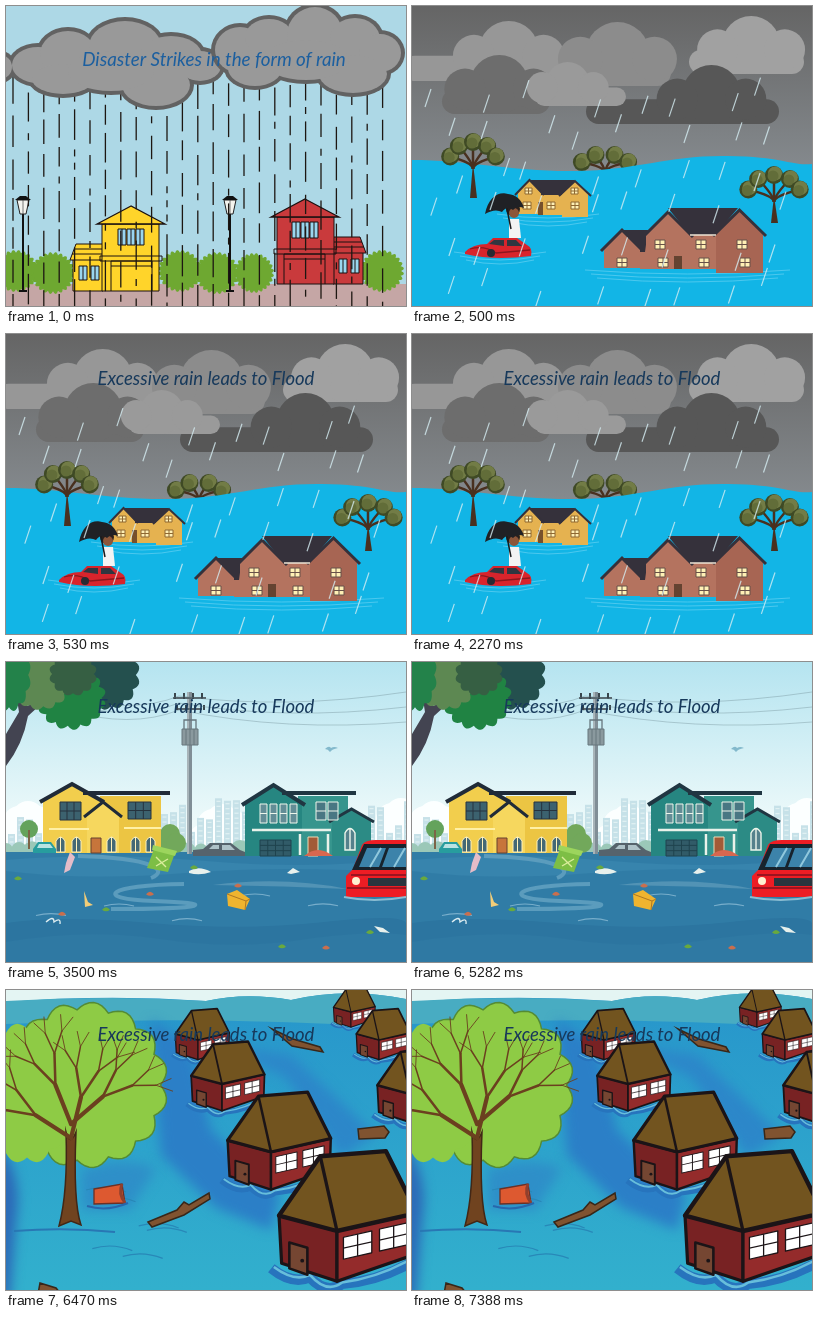
Recreate the animation shown at these times as an HTML page with a canvas. Size 400 px wide and 300 px high, loop 8 s.

```html
<!DOCTYPE html>
<html lang="en">
<head>
<meta charset="utf-8">
<title>Rain and flood</title>
<style>
  html, body { margin: 0; width: 100%; height: 100%; overflow: hidden; }
  canvas { display: block; width: 400px; height: 300px; }
</style>
</head>
<body>
<canvas id="stage" width="400" height="300"></canvas>
<script>
const ctx = document.getElementById('stage').getContext('2d');

// Drawing helpers
function path(d, fill, stroke, width = 1) {
  const p = new Path2D(d);
  if (fill) { ctx.fillStyle = fill; ctx.fill(p); }
  if (stroke) { ctx.strokeStyle = stroke; ctx.lineWidth = width; ctx.stroke(p); }
}
function box(x, y, w, h, fill, stroke, width) {
  path(`M${x} ${y}h${w}v${h}h${-w}z`, fill, stroke, width);
}
function oval(x, y, rx, ry, fill) {
  ctx.fillStyle = fill;
  ctx.beginPath();
  ctx.ellipse(x, y, rx, ry, 0, 0, Math.PI * 2);
  ctx.fill();
}
const dot = (x, y, r, fill) => oval(x, y, r, r, fill);

function backdrop(top, bottom, height) {
  const g = ctx.createLinearGradient(0, 0, 0, height);
  g.addColorStop(0, top);
  g.addColorStop(1, bottom);
  box(0, 0, 400, 300, g);
}
function seeded(seed) {
  return (lo = 0, hi = 1) => {
    seed = (seed * 16807) % 2147483647;
    return lo + (hi - lo) * seed / 2147483647;
  };
}
function caption(text, x, y, color, size) {
  ctx.font = `italic ${size}px Lato, sans-serif`;
  ctx.textAlign = 'center';
  ctx.fillStyle = color;
  ctx.fillText(text, x, y);
}
// Closed outline with n scallops
function scallop(x, y, rx, ry, n, depth, fill, stroke) {
  let d = '';
  for (let i = 0; i < n * 8; i++) {
    const a = i * Math.PI / (n * 4);
    const k = 1 - depth + depth * Math.abs(Math.sin(a * n / 2));
    d += `${i ? 'L' : 'M'}${x + rx * k * Math.cos(a)} ${y + ry * k * Math.sin(a)}`;
  }
  path(d + 'z', fill, stroke, 1.5);
}
function panes(x, y, w, h, fill, frame, cols = 2, rows = 2) {
  box(x, y, w, h, fill, frame);
  for (let i = 1; i < cols; i++) path(`M${x + w * i / cols} ${y}v${h}`, null, frame);
  for (let i = 1; i < rows; i++) path(`M${x} ${y + h * i / rows}h${w}`, null, frame);
}
function windowRow(n, step, x, ...rest) {
  for (let i = 0; i < n; i++) panes(x + i * step, ...rest);
}
// House front under a pitched roof
function gable(left, right, top, eave, base, wall, roof, width = 3) {
  const mid = (left + right) / 2;
  path(`M${left + 3} ${base}V${eave - 2}L${mid} ${top}L${right - 3} ${eave - 2}V${base}z`, wall);
  path(`M${left} ${eave}L${mid} ${top}L${right} ${eave}`, null, roof, width);
}

// Scene 1: rain over the street
function stormCloud(lobes) {
  for (const [grow, color] of [[2, '#626262'], [-2, '#999']])
    for (const [x, y, rx, ry] of lobes) oval(x, y, rx + grow, ry + grow, color);
}
function lamp(x) {
  path(`M${x} 208V285`, null, '#111', 2);
  path(`M${x - 6} 194h12l-3 14h-6z`, '#f4f4ee', '#222');
  path(`M${x} 194v14`, null, '#444', 0.7);
  path(`M${x - 8} 194l5 -4h6l5 4z`, '#111');
  box(x - 4, 284, 8, 2, '#111');
}
function townHouse(x, y, side, color) {
  const ink = '#1a1010', glass = '#9ad6ee';
  ctx.save();
  ctx.translate(x, y);
  ctx.save();
  ctx.scale(side, 1);
  box(28, 53, 30, 32, color, ink);
  path('M28 38H55L61 54H28zM28 43H57M28 48H59', color, ink);
  box(-28, 18, 57, 67, color, ink);
  path('M0 0L34 18H-34z', color, ink, 1.3);
  path('M-31 50H31V55H-31zM-21 85V55H20V85M-21 60H20', null, ink);
  ctx.restore();
  windowRow(3, 9, -13, 23, 8, 16, glass, ink, 2, 1);
  windowRow(2, 12, side > 0 ? 34 : -52, 60, 8, 14, glass, ink, 2, 1);
  ctx.restore();
}
function rainyStreet() {
  box(0, 0, 400, 300, '#add8e6');
  box(0, 278, 400, 22, '#c5a6a5');
  for (const x of [10, 174, 376]) {
    for (const right of x < 300 ? [0, 37] : [0])
      scallop(x + right, 265 + right / 18, 22, 21, 24, 0.13, '#6ea831');
  }
  scallop(248, 267, 20, 20, 24, 0.13, '#6ea831');
  lamp(17);
  lamp(224);
  townHouse(125, 200, -1, '#ffd42a');
  townHouse(299, 193, 1, '#c93a3c');

  const rand = seeded(41);
  for (let x = 7; x < 388; x += 15.4) {
    let y = rand(66, 84);
    while (y < 300) {
      const len = rand() < 0.2 ? 7 : rand(19, 32);
      path(`M${x} ${y}v${len}`, null, '#1d1712', 1.3);
      y += len + rand(6, 13);
    }
  }
  stormCloud([[-6, 61, 14, 14], [32, 59, 28, 20], [62, 48, 30, 25], [119, 40, 38, 27],
    [165, 50, 33, 22], [194, 60, 23, 17], [57, 73, 33, 17], [150, 79, 36, 23], [105, 65, 45, 22]]);
  stormCloud([[234, 44, 27, 25], [263, 31, 26, 20], [309, 29, 30, 30], [349, 33, 27, 23],
    [374, 47, 23, 21], [249, 62, 29, 20], [347, 68, 36, 21], [300, 54, 45, 22]]);
  caption('Disaster Strikes in the form of rain', 208, 60, '#1c5f9f', 18.8);
}

// Scene 2: flooded countryside
function cloud(color, left, right, top, base, peak) {
  const h = base - top, x = left + (right - left) * peak;
  ctx.fillStyle = color;
  ctx.beginPath();
  ctx.roundRect(left, base - h * 0.42, right - left, h * 0.42, h * 0.21);
  ctx.fill();
  dot(x, top + h / 2, h / 2, color);
  for (const side of [-1, 1]) dot(x + side * h * 0.58, base - h * 0.42, h * 0.35, color);
}
function roundTree(x, root, y, n, rx, ry) {
  const bark = '#49301f';
  path(`M${x - 3} ${root}L${x} ${y}L${x + 4} ${root}z`, bark);
  for (let i = 0; i < n; i++) {
    const a = Math.PI * (i + 0.5) / n;
    const cx = x - rx * Math.cos(a), cy = y - ry * Math.sin(a);
    path(`M${x} ${y + 6}Q${x} ${y} ${cx} ${cy}`, null, bark, 2.5);
    dot(cx, cy, 9, '#3f4a25');
    dot(cx + 1, cy - 1.5, 7, '#727c46');
    dot(cx - 1, cy + 1, 5.5, '#626d39');
  }
}
function ripples(x, y, w) {
  for (let i = 0; i < 3; i++)
    path(`M${x + i * 6} ${y + i * 4}q${w / 2 - i * 6} 8 ${w - i * 12} 0`, null, '#5bcdf0', 0.8);
}
function floodedValley() {
  backdrop('#656565', '#858a8e', 165);
  cloud('#979797', -10, 174, 15, 75, 0.58);
  cloud('#8c8c8c', 145, 259, 16, 80, 0.53);
  cloud('#a1a1a1', 277, 392, 10, 68, 0.54);
  cloud('#6d6d6d', 30, 138, 49, 108, 0.53);
  cloud('#575757', 174, 367, 59, 118, 0.65);
  cloud('#9a9a9a', 123, 214, 56, 100, 0.36);

  roundTree(193, 170, 161, 4, 25, 13);
  path('M0 154C55 154 102 166 164 165S257 149 316 150S378 160 400 158V300H0z', '#12b5e6');
  roundTree(61, 192, 157, 5, 24, 21);
  roundTree(362, 217, 190, 5, 27, 21);
  ripples(85, 208, 102);
  ripples(42, 246, 92);
  ripples(173, 264, 205);

  const glass = '#fff0b5', slate = '#35313b', gold = '#e5b250', brick = '#b4735f';
  path('M118 174H163L150 192H128z', slate);
  box(128, 189, 25, 20, gold);
  gable(103, 132, 174, 189, 208, gold, slate, 2);
  gable(147, 179, 175, 190, 211, gold, slate, 2);
  windowRow(3, 24, 111, 196, 8, 7, glass, '#8e6832');
  windowRow(2, 46, 113, 182, 7, 6, glass, '#8e6832');
  box(126, 196, 5, 13, '#77502c');

  box(228, 229, 78, 34, brick);
  path('M209 224H236L233 246H225zM256 202H326L303 229H278z', slate);
  gable(189, 231, 224, 245, 262, brick, slate);
  gable(231, 281, 206, 231, 263, brick, slate);
  gable(301, 354, 204, 230, 267, '#a76553', slate);
  path('M278 229H304', null, '#eee4d4', 1.5);
  windowRow(3, 41, 243, 234, 10, 9, glass, '#665048');
  windowRow(4, 41, 205, 252, 10, 9, glass, '#665048');
  box(262, 250, 8, 13, '#644331');

  // Stranded driver
  path('M53 246Q61 238 75 238L81 232H105L115 239Q121 242 119 250Q82 255 53 248z', '#d8242c');
  path('M77 238L82 234H92V240zM95 234H104L110 240H95z', '#303640');
  path('M58 243Q72 239 84 247L118 244', null, '#8c171e', 1.3);
  dot(79, 247, 4, '#292a32');
  path('M97 213H107L109 232H97z', '#f3f3f3');
  dot(101, 203, 7, '#29201d');
  dot(102, 207, 5, '#8c563a');
  path('M92 188L99 223', null, '#1b1b1d', 1.5);
  path('M73 208C76 192 86 185 96 188Q108 189 112 202Q105 199 101 204Q95 199 90 206Q83 202 73 208z', '#202125');

  const rand = seeded(19);
  for (let y = 78; y < 280; y += 38)
    for (let x = 35; x < 400; x += 47)
      path(`M${x + rand(-16, 16)} ${y + rand(-8, 18)}l-6 18`, null, '#d6edf2cc', 1.2);
}

// Scene 3: flooded suburb
function skyline(rand) {
  for (let x = 2; x < 400; x += 9) {
    const h = rand(16, 52);
    box(x, 188 - h, 7, h, '#c6e1e8');
    for (let y = 191 - h; y < 186; y += 5) path(`M${x + 1.5} ${y}h4`, null, '#e6f4f5');
  }
  for (let x = 0; x < 400; x += 13) dot(x, 188, rand(6, 10), '#9bc8b8');
}
function yellowVilla() {
  const trim = '#202b38', glass = '#3c626f';
  for (let i = 0; i < 3; i++) dot(158 + i * 6, 181 - i % 2 * 9, 10, '#72a85b');
  box(94, 134, 61, 57, '#ecc543');
  gable(34, 98, 122, 140, 191, '#f2ce4d', trim, 4);
  gable(78, 116, 140, 155, 191, '#f6d75e', trim, 3);
  path('M77 131H164', null, trim, 4);
  panes(54, 140, 21, 18, glass, '#26333e', 3, 2);
  panes(122, 140, 23, 17, glass, '#26333e', 3, 2);
  box(85, 176, 10, 15, '#c7753b', '#674330');
  for (const x of [50, 66, 101, 125, 140])
    path(`M${x} 190v-11q4.5 -8 9 0v11zM${x + 4.5} 175v15`, '#446875', '#fff2bd');
  path('M43 167h40M118 166h37', null, '#fff0a5', 2);
}
function tealVilla() {
  const trim = '#203642', frame = '#edf6eb';
  box(292, 134, 50, 60, '#36958d');
  gable(236, 299, 123, 143, 194, '#268681', trim, 4);
  gable(323, 368, 147, 160, 194, '#2c8b85', trim, 3);
  path('M276 131H350', null, trim, 4);
  path('M246 168H325M294 172V193M322 172V193', null, '#e9f2ea', 2.5);
  windowRow(4, 10, 254, 142, 7, 19, '#638d96', frame, 1, 2);
  windowRow(2, 12, 310, 140, 10, 18, '#497783', frame, 1, 2);
  panes(254, 178, 31, 16, '#315b68', '#1f434e', 4, 3);
  box(302, 175, 10, 19, '#a25b37', '#eddab4');
  path('M339 188V171Q344 162 349 171V188zM344 167V188', '#55818c', frame, 1.4);
  path('M298 194q14 -12 29 0z', '#d8674f');
}
function redCar() {
  path('M340 235V214L347 207L356 183Q359 178 370 178H400V235z', '#ed1d24');
  path('M346 208L358 182H400V208z', '#17232d');
  path('M353 205L361 186H380L373 205zM383 186H400V205H376z', '#3c83aa');
  path('M364 205L375 186M388 205L399 186', null, '#90c8dd', 2);
  path('M345 213H400M341 226H400', null, '#9b1420', 2);
  box(362, 216, 38, 8, '#29353e');
  dot(350, 219, 4, '#fff0d0');
  path('M338 235Q368 241 400 235', null, '#8bbdd2', 2);
}
function suburb() {
  const rand = seeded(72);
  backdrop('#b5e4f0', '#f4fcfb', 180);
  for (const x of [22, 216, 395])
    for (let i = -2; i <= 2; i++) dot(x + i * 9, 158 + i * i * 5 - x % 3 * 3, 16, '#fcffff');
  skyline(rand);
  box(0, 190, 400, 110, '#307ca6');
  path('M0 198Q100 190 200 199T400 197V211Q280 203 180 211T0 209z', '#3784ad');
  path('M72 194C150 196 163 209 145 216M178 222C100 223 86 237 148 239S207 247 105 247', null, '#5b9cbd', 4);
  path('M207 223q70 -9 134 4q-60 -3 -134 -4', '#5293b5');
  path('M0 261Q55 253 145 261T318 260T400 262V300H0z', '#2c75a0');
  path('M0 280Q82 266 154 277T295 278T400 273V300H0z', '#2f79a3');
  for (let x = 30; x < 400; x += 68)
    path(`M${x} ${rand(204, 270)}q15 -4 30 0`, null, '#78aecb', 1.2);

  dot(23, 167, 9, '#64a35c');
  path('M23 168V187', null, '#7d6447', 2);
  yellowVilla();
  tealVilla();

  // Utility pole and wires
  path('M183.5 30V192', null, '#808e96', 5);
  path('M182 30V192', null, '#b6c0c4', 1.5);
  path('M167 36H200M171 47H196', null, '#59666d', 2);
  for (let x = 169; x < 200; x += 9) path(`M${x} 31v6m2 6v5`, null, '#39464d', 2);
  panes(176, 67, 16, 16, '#8a999e', '#66767d', 4, 1);
  path('M178 67V58H190V67', null, '#66767d', 1.3);
  for (let i = 0; i < 3; i++)
    path(`M60 ${34 + i * 7}Q125 ${53 + i * 7} 173 ${34 + i * 7}Q280 ${48 + i * 11} 400 ${30 + i * 15}`, null, '#65808a99', 0.6);
  path('M319 87q4 -4 6 -1q3 -2 7 0q-6 1 -8 4q-2 -3 -5 -3', '#83b9cc');

  // Tree
  path('M0 104V72L13 50L9 25H17L21 44L44 34L22 54Q17 82 0 104z', '#434451');
  scallop(102, 13, 32, 35, 13, 0.13, '#24504e');
  scallop(65, 36, 35, 32, 15, 0.13, '#208343');
  scallop(34, 21, 31, 27, 13, 0.13, '#5d8852');
  scallop(3, 13, 22, 37, 12, 0.13, '#23824a');
  scallop(67, 12, 24, 22, 12, 0.13, '#365f43');

  // Vehicles and litter
  path('M27 191V187L32 180H45L50 187V191z', '#279d9e');
  path('M33 182H44L47 186H31z', '#b9e3e2');
  path('M187 194V188L197 187L204 181H225L234 188L239 190V194z', '#56636c');
  path('M203 187L207 183H213V187zM216 183H224L229 188H216z', '#aec2c8');
  redCar();
  path('M149 184L169 191L162 210L141 206z', '#7dbe45');
  path('M147 183L171 189L169 194L146 188z', '#9cd55d');
  path('M150 195L160 205M162 197L150 204', null, '#dbed9c', 1.4);
  path('M221 232L231 228L244 237L239 248L222 244z', '#efb42f');
  path('M221 232L240 239L244 237M240 239L239 248', null, '#ad7724');
  path('M64 190L69 195L64 208L58 211L60 201z', '#e4bcc8');
  path('M78 229L82 240L87 243L79 245z', '#f2cd78');
  path('M183 209q10 -6 22 1q-11 4 -22 1zM281 211l6 -5l7 4l-9 2zM368 264l9 2l7 5l-10 -1z', '#e7f0ec');
  path('M40 260q8 -7 8 0q7 -5 6 2', null, '#deedf1', 1.3);
  for (let i = 0; i < 9; i++) {
    const x = 12 + i * 44, y = rand(205, 288);
    path(`M${x - 4} ${y}q4 -5 8 0q-4 3 -8 0`, i % 2 ? '#c96f4e' : '#69a93e');
  }
}

// Scene 4: drowned village
function hut(x, y) {
  const ink = '#1b1417', s = 0.3 + y * 0.0041;
  ctx.save();
  ctx.translate(x, y);
  ctx.scale(s, s);
  ctx.lineJoin = 'round';
  path('M-51 29Q-35 42 -21 36Q-8 50 4 41Q35 39 65 20', null, '#2774bd', 8);
  path('M-49 28Q-33 40 -21 34Q-8 49 4 40Q35 36 64 18', null, '#67bedb', 2);
  path('M-45-12L0 0V39L-43 25z', '#782223', ink, 2.5);
  path('M0 0L62-14L61 18L0 39z', '#942b2b', ink, 2.5);
  path('M-37 29V9L-23 13V34z', '#754632', ink, 2);
  dot(-27, 23, 1.5, ink);
  path('M-13-58L38-62L62-14L0 0L-45-12z', '#72541f', ink, 3.4);
  path('M-13-58L0 0', null, ink, 2.6);
  ctx.transform(1, -0.226, 0, 1, 0, 0);
  windowRow(2, 28, 5, 6, 22, 17, '#fff', ink);
  ctx.restore();
}
function branch(x, y, angle, len, width) {
  if (width < 0.8) return;
  const ex = x + len * Math.sin(angle), ey = y - len * Math.cos(angle);
  path(`M${x} ${y}L${ex} ${ey}`, null, '#6b401f', width);
  branch(ex, ey, angle - 0.4, len * 0.7, width * 0.6);
  branch(ex, ey, angle + 0.35, len * 0.75, width * 0.6);
}
function plank(d) {
  path(d, '#805330', '#382719', 1.5);
}
function village() {
  backdrop('#2795cb', '#32b0cd', 300);
  path('M0 0H400V9Q340 -3 285 10Q240 2 200 11Q100 4 0 12z', '#e4f5f3');
  path('M0 11Q100 5 200 11Q240 2 285 10Q340 -3 400 9V38Q200 25 0 34z', '#48acc2');

  // Soft shadows on the water
  ctx.save();
  ctx.filter = 'blur(6px)';
  path('M145 30L184 55L205 140L274 205L265 240L210 218L155 165z', '#2b7fc7');
  path('M215 55L285 65L370 145L335 168L280 88z', '#2c87c9');
  path('M-10 150Q18 185 10 230L4 310H-10z', '#2c69b7');
  path('M75 180Q116 165 150 178L124 220H76z', '#2e8fc8');
  ctx.restore();
  const rand = seeded(8);
  for (let i = 0; i < 6; i++)
    path(`M${rand(80, 220)} ${rand(195, 290)}q20 -6 40 2`, null, '#2888b8', 1.2);
  path('M8 241Q60 237 109 242', null, '#2877b4', 2);

  scallop(79, 95, 83, 83, 15, 0.09, '#8ecb45', '#548b35');
  scallop(21, 103, 50, 71, 12, 0.09, '#8ecb45');
  path('M60 142Q64 157 70 142Q67 212 75 235L65 231L53 236Q62 202 60 142z', '#70431f', '#422716', 1.5);
  ctx.lineCap = 'round';
  for (let i = 0; i < 4; i++) branch(65, 148 - i % 2 * 14, -1 + i * 0.62, 42, 4.2);
  ctx.lineCap = 'butt';

  hut(192, 50);
  hut(345, 22);
  hut(373, 50);
  hut(216, 94);
  hut(404, 104);
  hut(265, 162);
  hut(331, 241);

  plank('M142 232L171 220L178 212L183 215L203 203L204 209L178 225L146 237z');
  plank('M266 39L287 49L314 57L317 62L286 56z');
  plank('M352 139L378 136L383 142L379 148L353 149z');
  plank('M34 293L50 298L55 304H32z');
  path('M88 199L116 194L119 213L88 214z', '#dd5930', '#6b3026', 1.3);
  path('M116 194Q112 203 119 213', null, '#91402d', 3);
  path('M81 216Q101 222 122 213', null, '#2767ad', 2);
}

// Timeline
const LOOP = 8000;
const floodCaption = () => caption('Excessive rain leads to Flood', 200, 51, '#17395b', 18.5);
const shots = [
  [0, rainyStreet],
  [500, floodedValley],
  [530, () => { floodedValley(); floodCaption(); }],
  [3430, () => { suburb(); floodCaption(); }],
  [6470, () => { village(); floodCaption(); }]
];
const start = performance.now();
let shown = null;

function tick() {
  const t = (performance.now() - start) % LOOP;
  const shot = shots.filter(s => s[0] <= t).pop();
  if (shot !== shown) {
    shown = shot;
    ctx.clearRect(0, 0, 400, 300);
    shot[1]();
  }
  requestAnimationFrame(tick);
}
tick();
</script>
</body>
</html>
```
